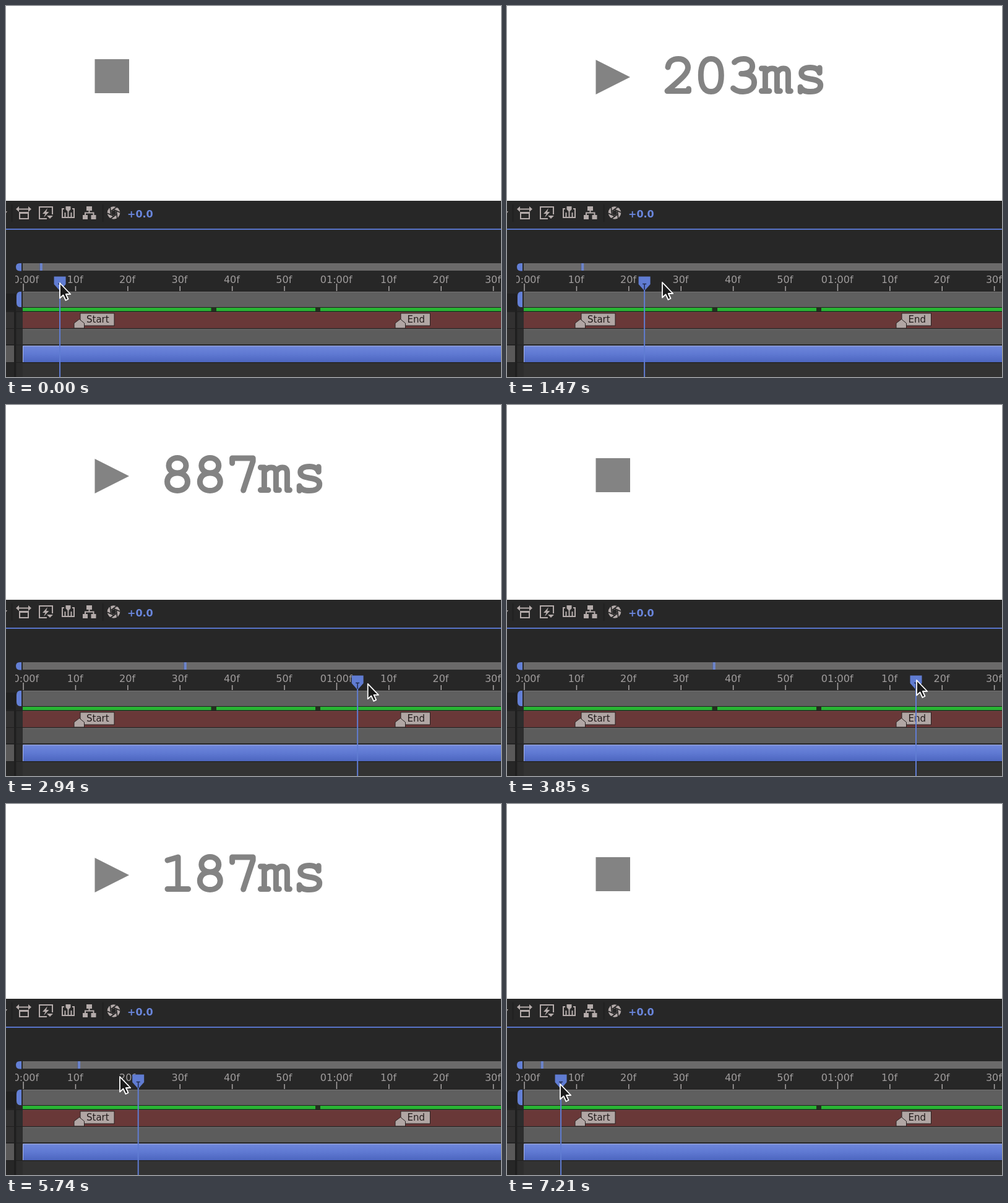
These frames come from a looping animation (800x600 px, 7280 ms). An HTML page:

```html
<!DOCTYPE html>
<html lang="en">
<head>
<meta charset="utf-8">
<title>Timeline scrub</title>
<style>
  html, body { margin: 0; width: 100%; height: 100%; overflow: hidden; background: #fff; }
  svg { display: block; width: 800px; height: 600px; }
  text { font-family: "DejaVu Sans", sans-serif; font-size: 16px; }
  #ruler text { fill: #a09d9d; text-anchor: middle; }
  .tag text { fill: #241c1c; font-size: 15px; }
  .tag path, .tag rect { fill: #b1a6a4; stroke: #2a2222; }
  .letters path { fill: none; stroke: #838383; stroke-width: 9; stroke-linecap: round; stroke-linejoin: round; }
  #reading { fill: transparent; font: bold 88px "Liberation Mono", monospace; }
  .line { fill: none; stroke: #b4abaa; stroke-width: 2; }
  .solid { fill: #b4abaa; }
</style>
</head>
<body>
<svg viewBox="0 0 800 600" xmlns="http://www.w3.org/2000/svg">
  <defs>
    <linearGradient id="layer" x1="0" y1="0" x2="0" y2="1">
      <stop offset="0" stop-color="#6f87dc"/>
      <stop offset=".5" stop-color="#5f79d2"/>
      <stop offset="1" stop-color="#4d66c0"/>
    </linearGradient>
    <clipPath id="rulerClip"><rect x="15" y="430" width="785" height="32"/></clipPath>
  </defs>
  <rect width="800" height="600" fill="#fff"/>

  <rect id="stop" x="143.5" y="86" width="55.5" height="55" fill="#838383"/>
  <g id="running">
    <path d="M143.5 87L199 115L143.5 143Z" fill="#838383"/>
    <g id="letters" class="letters"></g>
    <text id="reading" x="250.5" y="142"></text>
  </g>

  <!-- toolbar -->
  <rect y="315" width="800" height="285" fill="#272727"/>
  <path d="M9.5 321V349M156.5 321V349" stroke="#212121" stroke-width="2"/>
  <path d="M0 332L2 332L0 335Z" class="solid"/>
  <path class="line" d="M19 328.5H39M22 334H36V344H22Z"/>
  <path class="solid" d="M16 328.5L21 324V333ZM41 328.5L36 324V333ZM21 333H37V336H21Z"/>
  <path class="line" d="M75 337V325H54V344H66" stroke-width="2"/>
  <path class="solid" d="M67 327L59 336H63.5L61 342L69.5 333H65ZM66 339H76L71 344Z"/>
  <path class="line" d="M94 328H91V342H110V328H107M95.5 341V334M100.5 341V332M105.5 341V334"/>
  <path class="solid" d="M96.500 324H104.500V329L100.500 333L96.500 329Z"/>
  <path class="solid" d="M130 324H139V331H130ZM124 338H132V345H124ZM137.500 338H145.500V345H137.500Z"/>
  <path class="line" d="M134.500 330V334.500M128 339V334.500H141.500V339"/>
  <g id="aperture" transform="translate(174 334.500)"><circle r="10.300" class="solid"/></g>
  <text x="196" y="342" fill="#6a86dc" font-weight="bold">+0.0</text>
  <rect y="360" width="800" height="2" fill="#5873c8"/>

  <!-- navigator, ruler and work area -->
  <rect x="27" y="416" width="773" height="12" fill="#6b6a6a"/>
  <path d="M25 416V428.500H22Q16 428 16 422Q16 416 22 416Z" fill="#6480d6"/>
  <g id="nav">
    <rect x="-2.500" y="416" width="5" height="12" fill="#6c84cc"/>
    <rect x="-2.500" y="416" width="1" height="12" fill="#56596a"/>
  </g>
  <g id="ruler" clip-path="url(#rulerClip)"></g>
  <rect x="27" y="462" width="773" height="25" fill="#5f5f5f"/>
  <rect x="27" y="462" width="773" height="1" fill="#757373"/>
  <path d="M25 462V487H22Q17 486 17 480V469Q17 463 22 462Z" fill="#6480d6"/>
  <rect x="27" y="487" width="773" height="8" fill="#1f1f1f"/>
  <rect x="27" y="488" width="773" height="5.500" fill="#29b534"/>
  <rect id="gap" x="331.500" y="487" width="8.500" height="7" fill="#22301f"/>
  <rect x="500" y="487" width="8" height="7" fill="#22301f"/>

  <!-- layers -->
  <rect x="27" y="495" width="773" height="26" fill="#693838"/>
  <rect x="27" y="495" width="773" height="1" fill="#7a4746"/>
  <rect x="27" y="522" width="773" height="25" fill="#5c5c5c"/>
  <rect x="27" y="521" width="773" height="1.500" fill="#242424"/>
  <rect x="27" y="522.500" width="773" height="1" fill="#737171"/>
  <rect x="27" y="547" width="773" height="2.500" fill="#292929"/>
  <rect x="27" y="549.500" width="773" height="26.500" fill="url(#layer)"/>
  <path d="M27.500 576V550H800" fill="none" stroke="#a9b5e6"/>
  <rect x="27" y="576" width="773" height="1.500" fill="#242424"/>
  <rect x="27" y="577.500" width="773" height="22.500" fill="#333"/>
  <rect y="465" width="13" height="28" fill="#202020"/>
  <path d="M0 495H13V521H0ZM0 522H13V547H0Z" fill="#323131"/>
  <rect y="549" width="13" height="27" fill="#5a5959"/>
  <rect x="17" y="495" width="10" height="105" fill="#2d2d2d"/>
  <path d="M14.500 465V600" stroke="#1c1c1c" stroke-width="2"/>
  <path d="M0 494.500H27M0 521.500H27M0 548H27M0 576.500H27" stroke="#202020"/>

  <g class="tag">
    <rect x="120" y="497" width="55" height="20"/>
    <path d="M110 521V513L118.500 506.500L126.500 513V521Z"/>
    <text x="130" y="512">Start</text>
    <rect x="638" y="497" width="47.500" height="20"/>
    <path d="M629 521V513L637.500 506.500L645.500 513V521Z"/>
    <text x="648.500" y="512">End</text>
  </g>

  <g id="head">
    <rect x="-1" y="456" width="2" height="144" fill="#607cd2"/>
    <path d="M-9.500 437.500H9.500V450L1 459.500H-1L-9.500 450Z" fill="#607cd2"/>
    <path d="M-3 449.500H3M0 449.500V459" stroke="#222b4c" stroke-width="1.500"/>
  </g>
  <path id="cursor" d="M0 0V24.500L5.500 19.500L9.500 28L13.500 26L9.800 18H17.200Z"
    fill="#1c1c1c" stroke="#fff" stroke-width="1.800" stroke-linejoin="round"/>
</svg>

<script>
const LOOP = 7280, STEP = 70;
const START = 10.8, END = 72.2;
const ORIGIN = 28, PITCH = 8.44;
const $ = id => document.getElementById(id);

function add(parent, tag, attrs, text) {
  const el = document.createElementNS("http://www.w3.org/2000/svg", tag);
  for (const k in attrs) el.setAttribute(k, attrs[k]);
  if (text) el.textContent = text;
  parent.append(el);
  return el;
}

// Slab lettering: strokes around each character's centre line.
const GLYPHS = {
  0: "M0 85.5C11 85.5 16.5 95 16.5 112S11 138.5 0 138.5S-16.5 129 -16.5 112S-11 85.5 0 85.5Z",
  1: "M-16 91L1 86V137.500M-16 137.500H17.500",
  2: "M-17 99C-16 90 -9 85.5 0 85.5C10 85.5 15.500 92 15.500 99.500C15.500 108 8 115 -18 137.500H16.500V134",
  3: "M-15 91C-11 87 -6 85.5 0 85.5C9 85.5 14 91 14 97.500C14 105 8 109.500 -4 109.500C10 109.500 17 114 17 123.500C17 133 9 138.500 -1 138.500C-9 138.500 -14 136 -17 133",
  4: "M10 137.500V86H5L-17 120H16M-1 137.500H16",
  5: "M13 86H-12V110C-8 107 -4 105.500 1 105.500C11 105.500 18 112 18 121.500C18 132 10 138.500 0 138.500C-8 138.500 -14 136 -17 132.500",
  6: "M17 86.500C-4 83 -14 102 -14 120C-14 132 -7 138.500 2 138.500C11 138.500 17 132 17 122.500C17 113 11 107 2.500 107C-6 107 -13 113 -14 121",
  7: "M-17 94V86H16.500V91L1 138",
  8: "M0 85.500C8 85.500 14 91 14 98S8 110 0 110S-14 105 -14 98S-8 85.500 0 85.500ZM0 110C10 110 16.500 116 16.500 124S10 138.500 0 138.500S-16.500 132 -16.500 124S-10 110 0 110Z",
  9: "M-14 137.500C7 141 17 122 17 104C17 92 10 85.500 1 85.500C-8 85.500 -14 92 -14 101C-14 110 -8 116.500 0 116.500C9 116.500 16 111 17 103",
  m: "M-24 101H-18V137.500M-24 137.500H-11.500M-18 108C-15 103 -11 101 -7 101C-1 101 1 104 1 110V137.500H6M1 108C4 103 7 101 11 101C17 101 19 104 19 110V137.500H23",
  s: "M17 100V108C15 102 9 99.500 2 99.500C-7 99.500 -12.500 103 -12.500 108.500C-12.500 115 -6 116.500 2 118C12 119.500 18.500 121.500 18.500 128C18.500 135 12 138.500 2 138.500C-6 138.500 -12 136 -14 131V138.500"
};

const labels = ["00:00f", "10f", "20f", "30f", "40f", "50f", "01:00f", "10f", "20f", "30f"];
labels.forEach((label, i) => {
  const x = ORIGIN + i * PITCH * 10;
  add($("ruler"), "text", { x: x - 0.7, y: 447.5 }, label);
  add($("ruler"), "rect", { x: x - 0.7, y: i % 6 ? 453 : 449, width: 1.5, height: i % 6 ? 8 : 12, fill: "#aaa6a6" });
});

for (let a = 0; a < 360; a += 60)
  add($("aperture"), "path", { d: "M-4.500 -2.500L5 -9.500", stroke: "#272727", "stroke-width": 1.7, transform: `rotate(${a})` });
add($("aperture"), "circle", { r: 3.8, fill: "#272727" });

// time, playhead frame, cursor x, cursor y
const KEYS = [
  [0, 7, 87, 448], [420, 7.6, 94, 449], [770, 11.4, 128, 449], [1120, 15, 170, 448],
  [1470, 23, 251, 447], [1850, 33.5, 330, 451], [2240, 45, 416, 456], [2700, 58, 532, 453],
  [3150, 69, 622, 449], [3500, 74.4, 660, 446], [3850, 75, 662, 445], [4060, 73.6, 640, 444],
  [4340, 66, 562, 443], [4690, 54, 465, 442], [5200, 39, 334, 441], [5740, 22, 184, 441],
  [6090, 16, 142, 444], [6440, 12.4, 120, 448], [6790, 8.6, 96, 452], [7000, 7, 87, 453],
  [7210, 7, 86, 453]
];

// Monotone cubic through one column of KEYS.
function at(t, col) {
  const last = KEYS.length - 1;
  const secant = i => (KEYS[i + 1][col] - KEYS[i][col]) / (KEYS[i + 1][0] - KEYS[i][0]);
  const slope = i => {
    if (i === 0 || i === last) return 0;
    const a = secant(i - 1), b = secant(i);
    return a * b > 0 ? 2 * a * b / (a + b) : 0;
  };
  let i = 0;
  while (i < last - 1 && KEYS[i + 1][0] <= t) i++;
  const [p, q] = [KEYS[i], KEYS[i + 1]];
  const span = q[0] - p[0], u = Math.min(1, (t - p[0]) / span), v = 1 - u;
  return p[col] * v * v * (1 + 2 * u) + q[col] * u * u * (3 - 2 * u)
    + span * u * v * (v * slope(i) - u * slope(i + 1));
}

let shown = "";
function spell(text) {
  if (text === shown) return;
  shown = text;
  $("letters").replaceChildren();
  [...text].forEach((ch, i) =>
    add($("letters"), "path", { d: GLYPHS[ch], transform: `translate(${277 + i * 52.8} 0)` }));
  $("reading").textContent = text;
}

const move = (id, x, y = 0) => $(id).setAttribute("transform", `translate(${x} ${y})`);
const show = (id, on) => $(id).setAttribute("visibility", on ? "visible" : "hidden");

function draw(now) {
  const t = Math.floor((now % LOOP) / STEP) * STEP;
  const frame = Math.round(at(t, 1));
  const x = ORIGIN + frame * PITCH;
  move("head", x);
  move("nav", 56.5 + (x - 87.5) * 0.4843);
  move("cursor", at(t, 2), at(t, 3));
  show("gap", t < 5320);

  // The viewer stalls briefly on an uncached stretch.
  const view = t >= 4560 && t < 4760 ? 58 : frame;
  const running = view > START && view < END;
  show("running", running);
  show("stop", !running);
  if (running) spell(Math.round((view - START) * 1000 / 60) + "ms");
}

function tick() {
  draw(performance.now());
  requestAnimationFrame(tick);
}
tick();
</script>
</body>
</html>
```
